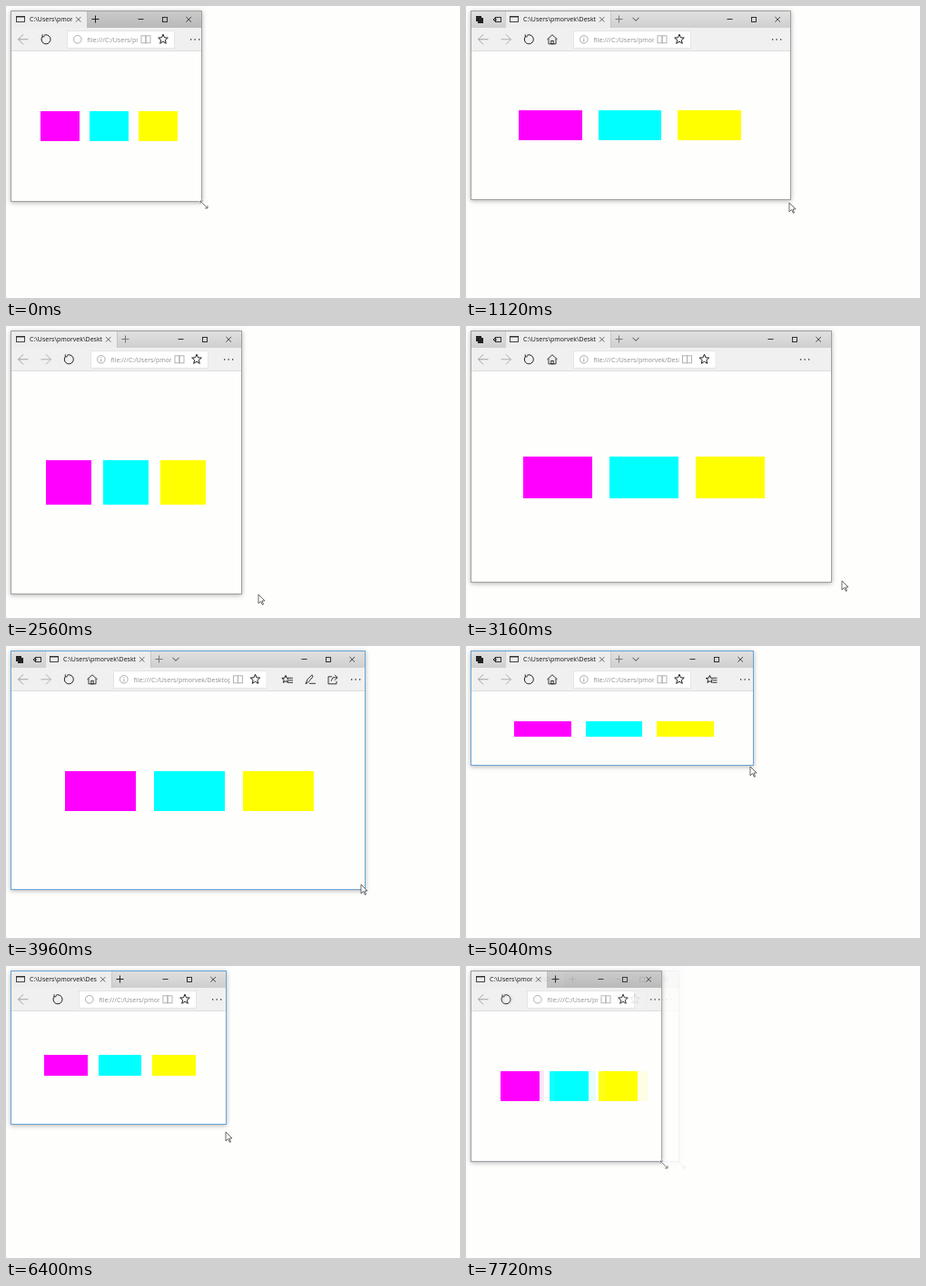
An HTML page with a canvas that plays this animation: 500 by 322 pixels, repeating every 7760 ms.

```html
<!DOCTYPE html>
<html lang="en">
<head>
<meta charset="utf-8">
<title>Resizing a browser window</title>
<style>
html, body { margin: 0; width: 100%; height: 100%; overflow: hidden; background: #fefefd; }
canvas { display: block; width: 500px; height: 322px; }
</style>
</head>
<body>
<canvas id="stage" width="500" height="322"></canvas>
<script>
const LOOP = 7760, STEP = 40, FADE = 7360;
const LAG = 80;    // the page and toolbar follow the frame this late
const LEAD = 120;  // the pointer runs this far ahead of it
const TITLE = 'C:\\Users\\pmorvek\\Deskt';
const ADDRESS = 'file:///C:/Users/pmorvek/Desktop/index.html';
const FONT = '7px "Open Sans", "Noto Sans", sans-serif';
const INK = '#222', GREY = '#999';

const stage = document.getElementById('stage');
const view = stage.getContext('2d');
const spare = document.createElement('canvas');
spare.width = stage.width;
spare.height = stage.height;
const layer = spare.getContext('2d');
let c = view;

// Corner of the window: time, right, bottom
const path = [
  [-LAG, 221, 215], [0, 215, 215], [1120, 357, 213], [2280, 258, 295],
  [2520, 258, 295], [3280, 412, 279], [3960, 395, 268], [5040, 316, 131],
  [5760, 291, 136], [6400, 242, 174], [7240, 234, 215], [LOOP + LEAD, 234, 215]
];

// Monotone cubic through the keys, so the edges never overshoot.
function sample(t, col) {
  const slope = i => (path[i + 1][col] - path[i][col]) / (path[i + 1][0] - path[i][0]);
  const tangent = i => {
    if (i === 0 || i === path.length - 1) return 0;
    const a = slope(i - 1), b = slope(i);
    return a * b <= 0 ? 0 : 2 * a * b / (a + b);
  };
  let i = 0;
  while (i < path.length - 2 && t >= path[i + 1][0]) i++;
  const h = path[i + 1][0] - path[i][0];
  const u = (t - path[i][0]) / h, v = 1 - u;
  const s = u * u * (3 - 2 * u);
  return path[i][col] * (1 - s) + path[i + 1][col] * s +
    h * u * v * (tangent(i) * v - tangent(i + 1) * u);
}

const corner = t => ({ x: Math.round(sample(t, 1)), y: Math.round(sample(t, 2)) });
const clamp = (v, lo, hi) => Math.max(lo, Math.min(hi, v));

function rect(x, y, w, h, fill) {
  c.fillStyle = fill;
  c.fillRect(x, y, w, h);
}

function frame(x, y, w, h, color, width = 0.9) {
  c.strokeStyle = color;
  c.lineWidth = width;
  c.strokeRect(x, y, w, h);
}

// Each run is a flat list of x, y pairs around the icon centre.
function lines(x, y, color, width, ...runs) {
  c.strokeStyle = color;
  c.lineWidth = width;
  c.beginPath();
  for (const r of runs) {
    c.moveTo(x + r[0], y + r[1]);
    for (let i = 2; i < r.length; i += 2) c.lineTo(x + r[i], y + r[i + 1]);
  }
  c.stroke();
}

function arc(x, y, r, from, to, color, width) {
  c.strokeStyle = color;
  c.lineWidth = width;
  c.beginPath();
  c.arc(x, y, r, from, to);
  c.stroke();
}

function clipText(str, x, y, end, color) {
  c.save();
  c.beginPath();
  c.rect(x - 1, y - 10, Math.max(0, end - x + 1), 14);
  c.clip();
  c.font = FONT;
  c.fillStyle = color;
  c.fillText(str, x, y);
  c.restore();
}

const dash = (x, y, r, color) => lines(x, y, color, 0.9, [-r, 0, r, 0]);
const cross = (x, y, r, color) => lines(x, y, color, 0.8, [-r, -r, r, r], [r, -r, -r, r]);
const plus = (x, y, r, color) => lines(x, y, color, 1, [-r, 0, r, 0], [0, -r, 0, r]);

function star(x, y, r) {
  c.beginPath();
  for (let i = 0; i < 10; i++) {
    const a = (i / 5 - 0.5) * Math.PI, d = i % 2 ? r * 0.44 : r;
    c.lineTo(x + d * Math.cos(a), y + d * Math.sin(a));
  }
  c.closePath();
  c.strokeStyle = INK;
  c.lineWidth = 1;
  c.stroke();
}

function arrow(x, y, dir, r, color) {
  lines(x, y, color, 0.9, [-r * dir, 0, r * dir, 0], [0, -r, r * dir, 0, 0, r]);
}

function refresh(x, y) {
  arc(x, y, 5, -2, 3.9, INK, 1);
  lines(x, y, INK, 0.9, [-4, -5.5, -4, -3, -1.5, -3]);
}

function home(x, y) {
  lines(x, y, INK, 0.9, [-5.5, 0, 0, -5, 5.5, 0], [-4, -1, -4, 5, 4, 5, 4, -1]);
  frame(x - 1.2, y + 1.5, 2.4, 3.5, INK);
}

function favourites(x, y) {
  star(x - 2, y, 4.4);
  rect(x + 1, y - 2, 6, 7, '#f0f0f0');
  for (let i = 0; i < 3; i++) dash(x + 3.5, y - 1.5 + i * 2.5, 2.5, INK);
}

function pen(x, y) {
  lines(x, y, INK, 0.9, [-5, 5, -3, 0, 2, -5, 3, -3, -2, 3, -5, 5], [-1, 4.5, 6, 4.5]);
}

function share(x, y) {
  lines(x, y, INK, 0.9, [-1, -3, -5, -3, -5, 5, 4, 5, 4, 2], [-2, 2, 0, -2, 5, -2, 2, -5],
    [5, -2, 2, 1]);
}

const extras = [favourites, pen, share];

function titleBar(R) {
  const dark = 22 * clamp((243 - R) / 28, 0, 1);
  const bar = c.createLinearGradient(0, 6, 0, 24);
  [224, 207].forEach((v, i) => bar.addColorStop(i, `rgb(${v - dark},${v - dark},${v - dark})`));
  rect(6, 6, R - 6, 18, bar);

  const wide = R >= 295;
  const left = wide ? 43 : 6;
  const end = left + Math.min(116, R - 132);
  rect(left, 6, end - left, 18, '#ededed');
  rect(end, 6, 0.6, 18, '#bbb');
  if (wide) {
    rect(left, 6, 0.6, 18, '#bbb');
    rect(11, 11, 6, 6, INK);
    rect(13, 13, 6, 6, INK);
    frame(32.5, 12.5, 6, 5, INK);
    arrow(32, 15, -1, 2, INK);
    lines(187, 14.5, '#444', 1, [-3.5, -1.7, 0, 1.8, 3.5, -1.7]);
  }
  frame(left + 5.5, 11.5, 9, 6, '#333');
  rect(left + 5, 11, 10, 1.5, '#333');
  clipText(TITLE, left + 20, 17.2, end - 16, '#111');
  cross(end - 9.3, 14.8, 2.7, '#444');
  plus(end + 9.5, 14.5, 4, R < 250 ? INK : '#777');

  dash(R - 66.5, 14.5, 3, INK);
  frame(R - 42.5, 12.5, 5, 5, INK);
  cross(R - 13.8, 14.8, 2.8, INK);
}

function toolBar(R, edge, growing) {
  rect(6, 24, R - 6, 26, '#f0f0f0');
  rect(6, 49, R - 6, 1, '#dedede');

  // The address box keeps 130 px; side buttons give way first.
  const start = clamp(edge - 165, 67, 118);
  const end = edge >= 358 ? edge - 110.5 : Math.min(248, edge - 35);
  const y = 36.8;
  arrow(19, y, -1, 5.5, GREY);
  if (start > 86) arrow(44, y, 1, 5.5, '#aaa');
  refresh(Math.min(69.3, start - 23), y);
  if (start > 112) home(95, y);

  rect(start, 27, end - start, 20, '#fff');
  frame(start + 0.5, 27.5, end - start - 1, 19, '#e3e3e3');
  arc(start + 11.8, y, 4.3, 0, 7, GREY, 0.8);
  if (start > 88) lines(start + 11.8, y, '#888', 0.8, [0, -2.5, 0, -1.5], [0, -0.5, 0, 2.6]);
  clipText(ADDRESS, start + 22.5, 39.7, end - 41, '#8e8e8e');
  frame(end - 37, y - 4, 5, 8, '#aaa');
  frame(end - 32, y - 4, 5, 8, '#aaa');
  star(end - 13, y, 5.6);

  // Extra buttons come back once the window stops growing.
  const count = growing ? 0 : clamp(Math.floor((edge - 35 - end) / 25), 0, 3);
  extras.slice(0, count).forEach((icon, i) => icon(end + 22.5 + i * 25, y));
  for (let i = 0; i < 3; i++) rect(edge - 18 + i * 4.5, 36.3, 1.3, 1.3, INK);
}

function page(size) {
  const w = size.x - 6, h = size.y - 50;
  const top = Math.round(50 + h * 0.4), bottom = Math.round(50 + h * 0.6);
  ['#f0f', '#0ff', '#ff0'].forEach((color, i) => {
    const x = Math.round(6 + w * (0.15 + 0.25 * i));
    rect(x, top, Math.round(6 + w * (0.35 + 0.25 * i)) - x, bottom - top, color);
  });
}

function pointer(x, y) {
  c.save();
  c.translate(x, y);
  c.beginPath();
  c.moveTo(0, 0);
  c.lineTo(0, 10);
  c.lineTo(2.5, 7.5);
  c.lineTo(4.5, 11.5);
  c.lineTo(5.5, 11);
  c.lineTo(4, 7);
  c.lineTo(7, 7);
  c.closePath();
  c.fillStyle = '#fff';
  c.fill();
  c.strokeStyle = '#444';
  c.lineWidth = 0.8;
  c.stroke();
  c.restore();
}

function sizer(x, y) {
  const runs = [[-4, -4, 4, 4], [-4, -1, -4, -4, -1, -4], [1, 4, 4, 4, 4, 1]];
  lines(x, y, '#fff', 2.4, ...runs);
  lines(x, y, '#555', 0.8, ...runs);
}

function scene(ctx, t) {
  c = ctx;
  const now = corner(t), late = corner(t - LAG), ahead = corner(t + LEAD);
  const R = now.x, B = now.y;
  rect(0, 0, 500, 322, '#fefefd');

  c.save();
  c.shadowColor = 'rgba(0,0,0,.3)';
  c.shadowBlur = 5;
  c.shadowOffsetY = 1;
  rect(5, 5, R - 4, B - 4, '#fff');
  c.restore();

  c.save();
  c.beginPath();
  c.rect(6, 6, R - 6, B - 6);
  c.clip();
  rect(6, 6, R - 6, B - 6, '#fefefd');
  titleBar(R);
  toolBar(R, late.x, R > late.x);
  page(late);
  c.restore();
  frame(5.5, 5.5, R - 5, B - 5, t > 3300 ? '#6aa5d6' : '#a0a0a0', 1);

  // A resting window shows the resize cursor on its corner.
  const resting = now.x === late.x && now.y === late.y;
  if (t === 0 || resting) sizer(R + 3, B + 4);
  else pointer(ahead.x + 2, ahead.y + 2);
}

function draw(now) {
  const t = Math.floor((now % LOOP) / STEP) * STEP;
  scene(view, t);
  if (t > FADE) {
    scene(layer, 0);
    view.globalAlpha = (t - FADE) / (LOOP - FADE);
    view.drawImage(spare, 0, 0);
    view.globalAlpha = 1;
  }
}

const begin = performance.now();
function tick() {
  draw(performance.now() - begin);
  requestAnimationFrame(tick);
}
tick();
</script>
</body>
</html>
```
